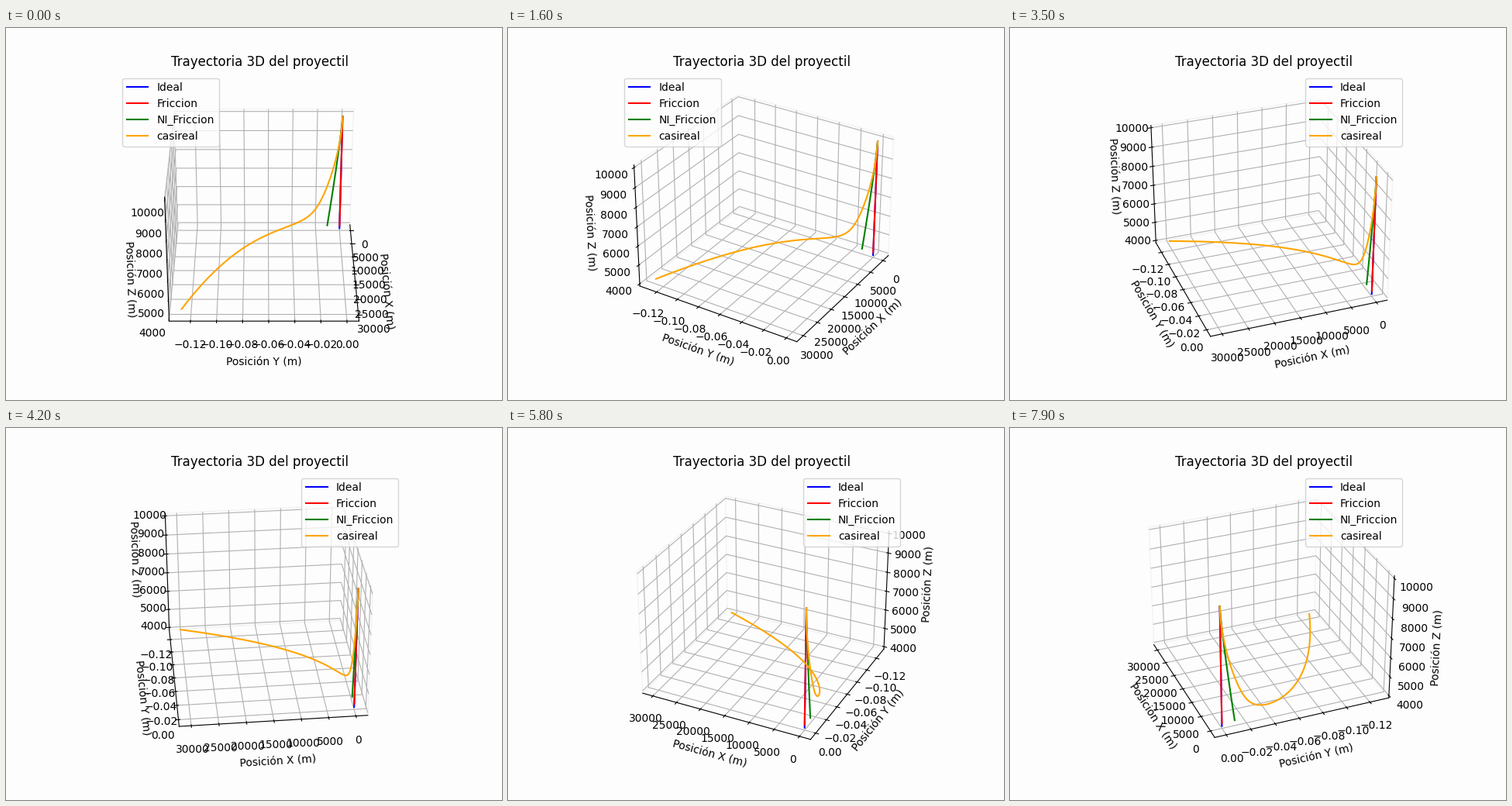
Animation, 640 px wide and 480 px high, one loop 8000 ms. Source, as a matplotlib script:

```python
import numpy as np
import matplotlib.pyplot as plt
from matplotlib.animation import FuncAnimation

FRAMES = 80
STEP = 2          # degrees of turn per frame
ELEV = 30
PAPER = "#fdfdfd"

TOP, GROUND, LANDING = 10000, 4000, 4155
X_MAX, Y_MIN = 30000, -0.1271

plt.rcParams.update({
    "font.family": "DejaVu Sans",
    "figure.facecolor": PAPER,
    "axes.facecolor": PAPER,
})


def fall(z_end, drift=0.0):
    """Drop from the top at x = 0 with a growing sideways drift in y."""
    f = np.linspace(0, 1, 80)
    return 0 * f, drift * f ** 1.2, TOP + (z_end - TOP) * f


def glide(n=300):
    """Steep fall that bends into a long run near the landing height."""
    q = np.linspace(1, 0, n)
    f = 1 - q ** 2
    r = 0.19 * f ** 1.75 + 0.81 * np.exp(-9 * q)
    return X_MAX * r ** 2.68, Y_MIN * r, TOP + (LANDING - TOP) * f


def padded(lo, hi, margin=0.0):
    mid = (lo + hi) / 2
    half = (hi - lo) / 2 * (1 + 2 * margin) * 25 / 24
    return mid - half, mid + half


fig = plt.figure(figsize=(6.4, 4.8), dpi=100)
ax = fig.add_subplot(projection="3d")

ax.plot(*fall(GROUND), color="blue", label="Ideal")
ax.plot(*fall(LANDING), color="red", label="Friccion")
ax.plot(*fall(LANDING, -0.0104), color="green", label="NI_Friccion")
ax.plot(*glide(), color="orange", label="casireal")

ax.set(
    xlim=padded(0, X_MAX, 0.05),
    ylim=padded(Y_MIN, 0, 0.05),
    zlim=padded(GROUND, TOP),
    xlabel="Posición X (m)",
    ylabel="Posición Y (m)",
    zlabel="Posición Z (m)",
)
ax.set_title("Trayectoria 3D del proyectil", x=0.4995)
ax.legend(loc="best")

for axis in (ax.xaxis, ax.yaxis, ax.zaxis):
    axis.set_pane_color(PAPER)
    axis.pane.set_edgecolor("#f3f3f3")


def update(i):
    # the tiny offset settles which walls show at right angles
    ax.view_init(elev=ELEV, azim=STEP * i + 0.001)
    return ax.lines


anim = FuncAnimation(fig, update, frames=FRAMES, interval=100, repeat=True,
                     repeat_delay=0, blit=False)
plt.show()
```
